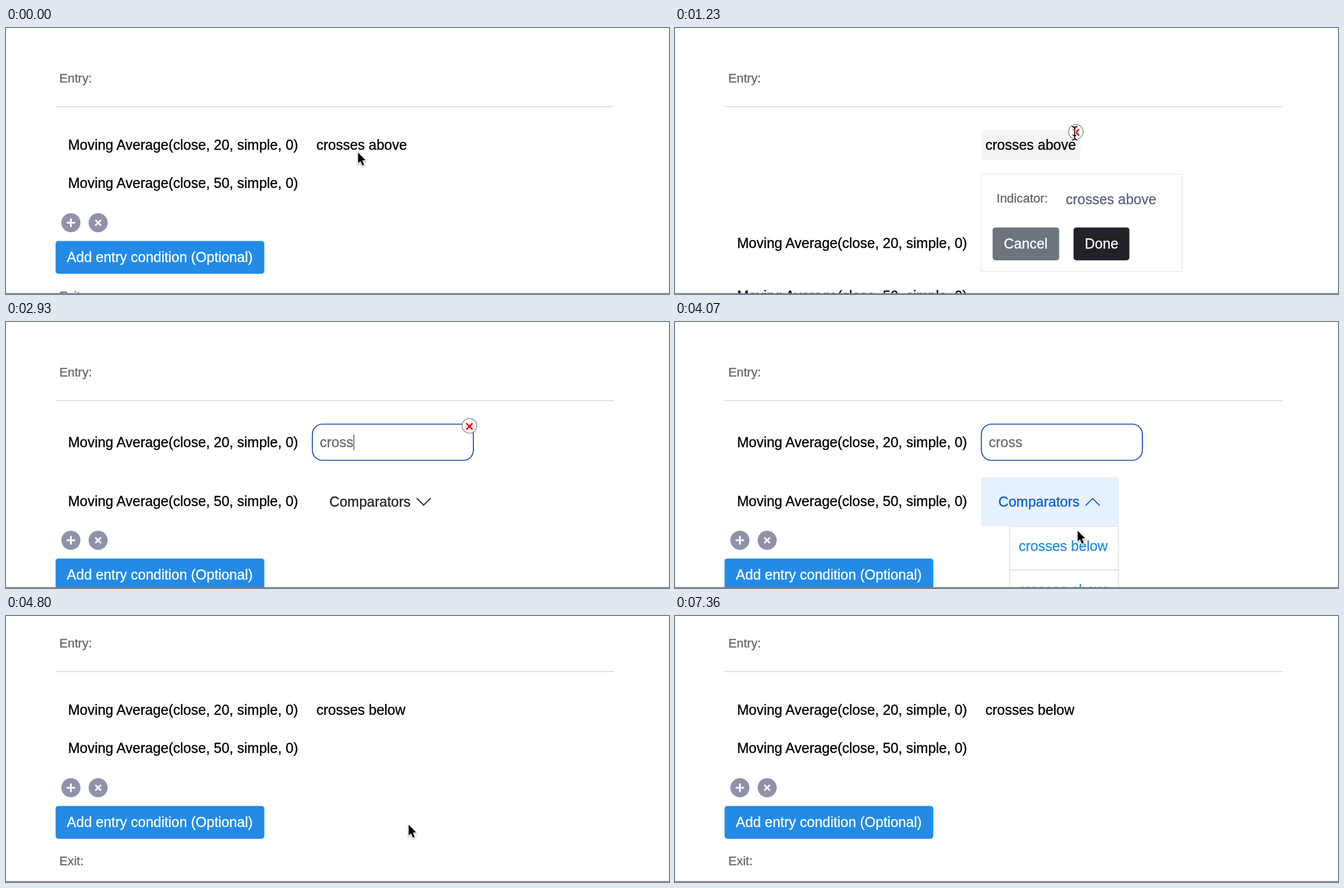
An HTML page with a canvas for the animation above (7.41 s loop, 1180x474 px).

```html
<!DOCTYPE html>
<html lang="en">
<head>
<meta charset="utf-8">
<title>Entry condition editor</title>
<style>
  html, body { margin: 0; width: 100%; height: 100%; overflow: hidden; background: #fff; }
  canvas { display: block; width: 1180px; height: 474px; }
</style>
</head>
<body>
<canvas id="stage" width="1180" height="474"></canvas>
<script>
const ctx = document.getElementById('stage').getContext('2d');
const LOOP = 7410;
const OPEN = 150, REMOVE = 1340, TYPE = 1900, KEY_GAP = 190, LEAVE = 3130,
      EXPAND = 3500, SCROLL = 4130, SCROLL_END = 4390, PICK = 4560, HIDE = 6600;
const BODY = 25, LABEL = 22.2;
const BLUE = '#238be6', GREY = '#666';

// Pointer stops: time, x, y
const PATH = [
  [0, 626, 221], [40, 626, 221], [220, 634, 209], [470, 640, 207], [630, 640, 207],
  [1150, 711, 188], [1340, 712, 187], [1650, 708, 205], [2930, 708, 205],
  [3400, 733, 322], [3700, 733, 322], [4000, 716, 371], [4850, 716, 371],
  [5210, 690, 347], [5770, 608, 268], [6000, 606, 266], [LOOP, 606, 266]
];

const ease = u => u * u * (3 - 2 * u);
const progress = (t, a, b) => ease(Math.min(1, Math.max(0, (t - a) / (b - a))));

function pointerAt(t) {
  let i = 1;
  while (i < PATH.length - 1 && PATH[i][0] < t) i++;
  const [t0, x0, y0] = PATH[i - 1], [t1, x1, y1] = PATH[i];
  const u = progress(t, t0, t1);
  return [x0 + (x1 - x0) * u, y0 + (y1 - y0) * u];
}

// A hairline outline gives the slightly heavier strokes of smoothed type
function text(str, x, mid, color = '#000', size = BODY) {
  const y = mid + (size === BODY ? 9 : 7);
  ctx.font = `${size}px "Liberation Sans", Arial, sans-serif`;
  ctx.fontKerning = 'normal';
  ctx.fillStyle = ctx.strokeStyle = color;
  ctx.lineWidth = 0.35;
  ctx.fillText(str, x, y);
  ctx.strokeText(str, x, y);
  return ctx.measureText(str).width;
}

function box(x, y, w, h, r, fill, stroke, line = 1.5) {
  ctx.beginPath();
  ctx.roundRect(x, y, w, h, r);
  if (fill) { ctx.fillStyle = fill; ctx.fill(); }
  if (stroke) { ctx.strokeStyle = stroke; ctx.lineWidth = line; ctx.stroke(); }
}

function button(x, y, w, label, fill) {
  box(x + 0.3, y + 0.4, w - 0.6, 58.6, 5, fill);
  text(label, x + 20.3, y + 29, '#fff');
}

function disc(x, y, r, fill, stroke) {
  ctx.beginPath();
  ctx.arc(x, y, r, 0, Math.PI * 2);
  ctx.fillStyle = fill;
  ctx.fill();
  if (stroke) { ctx.strokeStyle = stroke; ctx.lineWidth = 1.4; ctx.stroke(); }
}

function trace(points, color, width) {
  ctx.beginPath();
  points.forEach(([x, y]) => ctx.lineTo(x, y));
  ctx.strokeStyle = color;
  ctx.lineWidth = width;
  ctx.stroke();
}

function cross(x, y, r, color, width) {
  trace([[x - r, y - r], [x + r, y + r]], color, width);
  trace([[x - r, y + r], [x + r, y - r]], color, width);
}

function badge(x, y) {
  disc(x, y, 13, '#fff', '#8c8c8c');
  cross(x, y + 1, 5.5, '#e60000', 2.6);
}

function average(period, mid) {
  text(`Moving Average(close, ${period}, simple, 0)`, 110.4, mid);
}

function header() {
  text('Entry:', 95, 90, GREY, LABEL);
  ctx.fillStyle = '#d9d9d9';
  ctx.fillRect(88, 139.2, 993.5, 1.6);
}

function footer(y) {
  const fill = '#9092aa';
  disc(115.5, y, 17, fill);
  trace([[108, y], [123, y]], '#fff', 3);
  trace([[115.5, y - 7.5], [115.5, y + 7.5]], '#fff', 3);
  disc(164, y, 17, fill);
  cross(164, y, 5, '#fff', 3);
  button(88, y + 32, 372, 'Add entry condition (Optional)', BLUE);
  text('Exit:', 95, y + 131, GREY, LABEL);
}

function summary(comparator) {
  average(20, 208);
  text(comparator, 552.4, 208);
  average(50, 276);
  footer(347);
}

function popup() {
  average(20, 383);
  average(50, 477);
  box(545, 181.5, 176.5, 53.5, 6, '#f4f4f4');
  text('crosses above', 552.4, 208);
  badge(713.5, 185);
  box(545.2, 260.5, 357, 173.5, 0, '#fff', '#e9e9eb');
  text('Indicator:', 572.3, 304, GREY, LABEL);
  text('crosses above', 695.4, 305, '#5c637b');
  button(565, 355, 119, 'Cancel', '#6c757d');
  button(709, 355, 100, 'Done', '#222329');
}

function search(t) {
  const open = t >= EXPAND;
  average(20, 214);
  box(545.3, 182, 286.5, 64.5, 18, '#fff', '#0a3fae', 1.7);
  const count = t < TYPE ? 0 : 1 + Math.floor((t - TYPE) / KEY_GAP);
  const width = text('cross'.slice(0, count), 558.4, 214, '#6b6b6b');
  if (!open) trace([[559.5 + width, 200.5], [559.5 + width, 228.5]], '#555', 1.5);
  if (t < LEAVE) badge(824.8, 185);

  average(50, 319);
  footer(389);
  const tone = open ? '#0c5fd0' : '#212529';
  if (open) {
    ['crosses below', 'crosses above'].forEach((name, i) => {
      const y = 364 + 78 * i;
      box(595.5, y, 194, 78, 0, '#fff', '#dcdee0');
      text(name, 611.7, y + 35, BLUE);
    });
    box(545, 277, 245, 87, 0, '#e7f0fd');
  }
  text('Comparators', 575.6, 320, tone);
  const tip = open ? 314.5 : 326.5, ends = open ? 327 : 314;
  trace([[731, ends], [743.3, tip], [755.7, ends]], tone, 1.9);
}

function arrow(x, y) {
  const shape = [[0, 0], [0, 19], [4.2, 15.2], [7.6, 23], [10.8, 21.6], [7.5, 14], [13.3, 13.6]];
  ctx.save();
  ctx.translate(x + 0.6, y + 1);
  ctx.beginPath();
  shape.forEach(([px, py]) => ctx.lineTo(px, py));
  ctx.closePath();
  ctx.shadowColor = 'rgba(0,0,0,.35)';
  ctx.shadowBlur = 3;
  ctx.shadowOffsetY = 1.5;
  ctx.strokeStyle = '#fff';
  ctx.lineWidth = 2.6;
  ctx.stroke();
  ctx.shadowColor = 'transparent';
  ctx.fillStyle = '#000';
  ctx.fill();
  ctx.restore();
}

function beam(x, y) {
  for (const [color, width] of [['#fff', 5], ['#000', 1.9]]) {
    trace([[x, y - 10], [x, y + 10]], color, width);
    for (const s of [-1, 1]) {
      trace([[x - 5, y + 12 * s], [x - 2, y + 11.6 * s], [x, y + 9 * s],
             [x + 2, y + 11.6 * s], [x + 5, y + 12 * s]], color, width);
    }
  }
  trace([[x - 3, y + 4], [x + 3, y + 4]], '#000', 1.5);
}

function pointer(t) {
  if ((t >= TYPE && t < 2960) || t >= HIDE) return;
  const [x, y] = pointerAt(t);
  (t > 950 && t < LEAVE ? beam : arrow)(x, y);
}

function draw(t) {
  ctx.fillStyle = '#fff';
  ctx.fillRect(0, 0, 1180, 474);
  ctx.save();
  ctx.translate(0, -Math.round(41 * progress(t, SCROLL, SCROLL_END)));
  header();
  if (t < OPEN) summary('crosses above');
  else if (t < REMOVE) popup();
  else if (t < PICK) search(t);
  else summary('crosses below');
  ctx.restore();
  pointer(t);
  ctx.fillStyle = '#808080';
  ctx.fillRect(0, 472.4, 1180, 1.6);
}

const start = performance.now();
function tick() {
  draw((performance.now() - start) % LOOP);
  requestAnimationFrame(tick);
}
tick();
</script>
</body>
</html>
```
